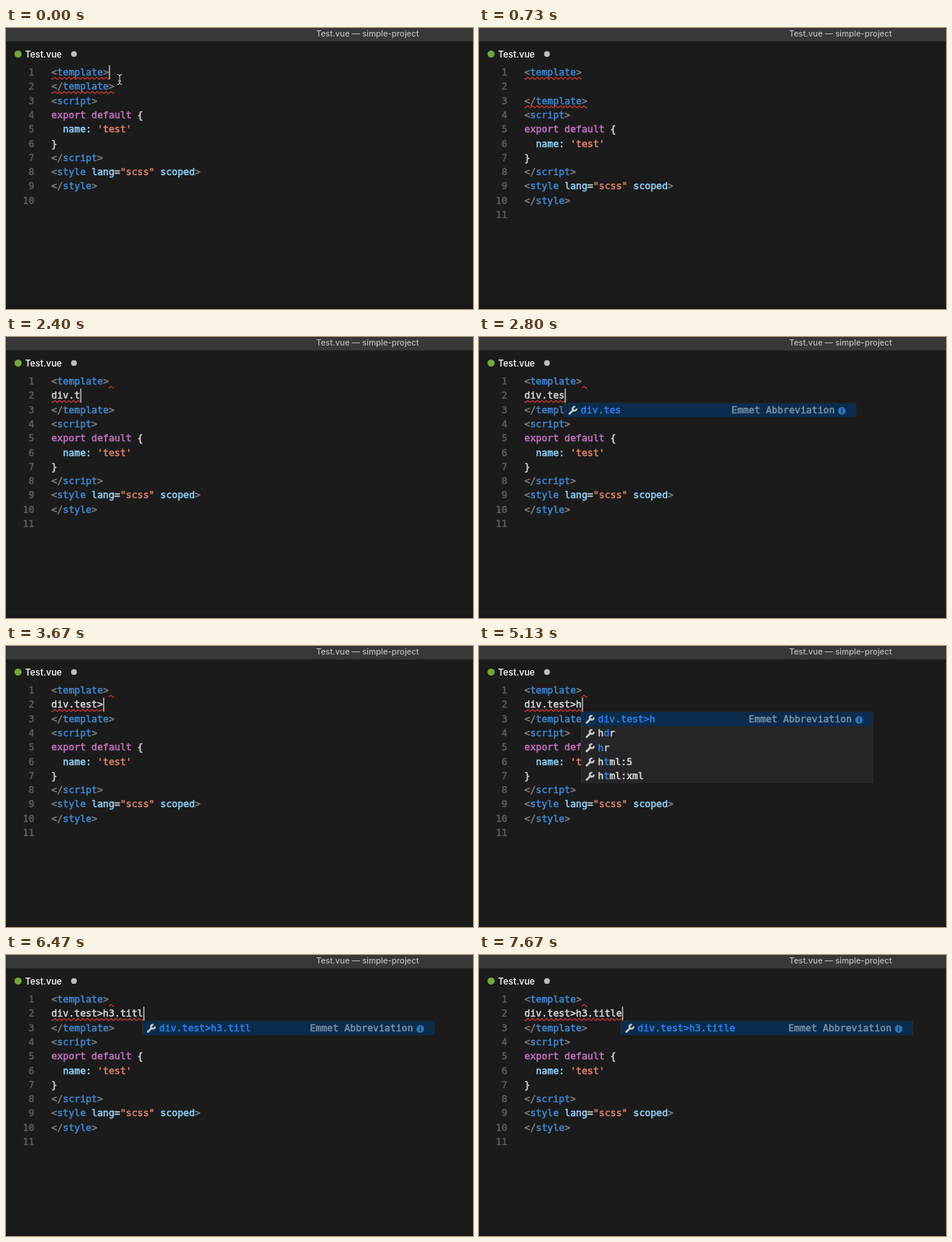
Animation, 600 px wide and 361 px high, one loop 8000 ms. Source, as an HTML page with a canvas:

```html
<!DOCTYPE html>
<html lang="en">
<head>
<meta charset="utf-8">
<title>Editor</title>
<style>
  html, body { margin: 0; width: 100%; height: 100%; overflow: hidden; background: #1b1b1b; }
  canvas { display: block; width: 600px; height: 361px; }
</style>
</head>
<body>
<canvas id="stage"></canvas>
<script>
const W = 600, H = 361, LOOP = 8000;
const CW = 7.37, LH = 18.3, LEFT = 58.3, TOP = 57;
const MONO = '12.24px "DejaVu Sans Mono", monospace';
const UI = 'Inter, "Open Sans", sans-serif';
const C = {
  bg: '#1b1b1b', text: '#d6d6d6', punct: '#7c7c7c', tag: '#3f86d0', attr: '#90d2fb',
  str: '#da8064', key: '#c26fc0', num: '#5c5c5c', error: '#d8392f', match: '#2b80ea',
  select: '#0b2c4c', detail: '#7690a6', info: '#2f76b8'
};

const canvas = document.getElementById('stage');
const ctx = canvas.getContext('2d', { alpha: false });
const dpr = window.devicePixelRatio || 1;
canvas.width = Math.round(W * dpr);
canvas.height = Math.round(H * dpr);

// Each line is a list of [colour, text] spans.
const tagLine = (open, name) => [['punct', open], ['tag', name], ['punct', '>']];
const head = tagLine('<', 'template');
const tail = [
  tagLine('</', 'template'),
  tagLine('<', 'script'),
  [['key', 'export default'], ['text', ' {']],
  [['attr', '  name:'], ['str', " 'test'"]],
  [['text', '}']],
  tagLine('</', 'script'),
  [['punct', '<'], ['tag', 'style'], ['attr', ' lang'], ['text', '='],
   ['str', '"scss"'], ['attr', ' scoped'], ['punct', '>']],
  tagLine('</', 'style'),
  []
];

const ENTER = 70, RECHECK = 1870, BLINK = 500;
const typed = 'div.test>h3.title';
const keys = [1000, 1470, 1600, 1800, 2270, 2600, 2800, 3000, 3670,
              4660, 5200, 5330, 5530, 6130, 6330, 6470, 6660];

// Suggestions by time; "=" stands for the typed text, brackets mark matches.
const menus = [
  [0, ''],
  [1130, '[d]atag [d]atal [d]et [d]lg [d]oc [d]d [d]iv [d]l [d]t'],
  [1470, '[di]v'],
  [1600, '[div]'],
  [1800, ''],
  [2470, '= tar[e]a [te]m t[e]x[t]area'],
  [2800, '='],
  [3670, ''],
  [4870, '= h[d]r [h]r h[t]ml:5 h[t]ml:xml'],
  [5200, '='],
  [5530, '= tar[e]a [te]m t[e]x[t]area'],
  [6130, '=']
];

const lineY = i => TOP + i * LH;
const colX = n => LEFT + n * CW;

function label(str, x, y, color, font, align = 'left') {
  ctx.font = font;
  ctx.textAlign = align;
  ctx.fillStyle = color;
  ctx.fillText(str, x, y);
}

function box(x, y, w, h, color) {
  ctx.fillStyle = color;
  ctx.fillRect(x, y, w, h);
}

function dot(x, y, r, color) {
  ctx.fillStyle = color;
  ctx.beginPath();
  ctx.arc(x, y, r, 0, Math.PI * 2);
  ctx.fill();
}

// A thin outline gives the text its heavier weight.
function code(str, x, y, color, align) {
  label(str, x, y + 4, color, MONO, align);
  ctx.strokeStyle = color;
  ctx.lineWidth = 0.5;
  ctx.lineJoin = 'round';
  ctx.strokeText(str, x, y + 4);
}

function drawLine(spans, row) {
  let col = 0;
  for (const [kind, str] of spans) {
    code(str, colX(col), lineY(row), C[kind]);
    col += str.length;
  }
}

function squiggle(row, from, to) {
  const y = lineY(row) + 7.6, end = colX(to);
  ctx.strokeStyle = C.error;
  ctx.lineWidth = 1.1;
  ctx.beginPath();
  for (let x = colX(from); x <= end; x += 0.5) {
    ctx.lineTo(x, y + 1.2 * Math.sin((x - LEFT) * Math.PI / 3));
  }
  ctx.stroke();
}

function drawFrame() {
  box(0, 0, W, H, C.bg);
  box(0, 0, W, 17, '#383838');
  box(0, 17, W, 1, '#222');
  box(0, 356, W, 5, '#181818');
  label('Test.vue — simple-project', 464.5, 11.2, '#bababa', '500 10.5px ' + UI, 'center');
  dot(15.5, 33.5, 4.6, '#72a83c');
  label('Test.vue', 24.5, 37.5, '#ececec', '600 11.3px ' + UI);
  dot(87.3, 33.4, 3.7, '#bdbdbd');
}

function drawPointer(x, y) {
  ctx.strokeStyle = '#d0d0d0';
  ctx.lineWidth = 1;
  ctx.beginPath();
  for (const s of [-1, 1]) {
    ctx.moveTo(x - 3, y + s * 6.5);
    ctx.quadraticCurveTo(x, y + s * 6.5, x, y + s * 4);
    ctx.quadraticCurveTo(x, y + s * 6.5, x + 3, y + s * 6.5);
  }
  ctx.moveTo(x, y - 5);
  ctx.lineTo(x, y + 5);
  ctx.moveTo(x - 2, y + 2);
  ctx.lineTo(x + 2, y + 2);
  ctx.stroke();
}

function drawWrench(x, y) {
  ctx.strokeStyle = '#c8c8c8';
  ctx.lineCap = 'round';
  ctx.lineWidth = 2.6;
  ctx.beginPath();
  ctx.moveTo(x - 4.2, y + 4.2);
  ctx.lineTo(x + 0.8, y - 0.8);
  ctx.stroke();
  ctx.lineCap = 'butt';
  ctx.lineWidth = 2.2;
  ctx.beginPath();
  ctx.arc(x + 2.3, y - 2.3, 2.6, -0.15, Math.PI * 1.6);
  ctx.stroke();
}

function drawMenu(list, word) {
  const rows = list.split(' ');
  const x = Math.round(colX(word.length) - 1.2), y = 84.6, w = 375.5;
  const h = rows.length * LH;
  box(x, y, w, h, '#323234');
  box(x + 1, y + 0.4, w - 2, h - 1, '#252527');
  box(x + 1, y + 0.4, w - 2, LH - 0.4, C.select);
  rows.forEach((row, i) => {
    const cy = y + LH * (i + 0.5) + 0.4;
    drawWrench(x + 11.5, cy + 0.3);
    let tx = x + 21.8;
    row.replace('=', `[${word}]`).split(/[[\]]/).forEach((part, k) => {
      code(part, tx, cy, k % 2 ? C.match : C.text);
      tx += part.length * CW;
    });
  });
  const cy = y + LH / 2 + 0.4;
  code('Emmet Abbreviation', x + 215.5, cy, C.detail);
  dot(x + 357.2, cy + 0.8, 4.9, C.info);
  box(x + 356.5, cy - 0.6, 1.5, 4.2, C.select);
  box(x + 356.5, cy - 2.6, 1.5, 1.3, C.select);
}

function render(t) {
  const entered = t >= ENTER;
  const pressed = keys.filter(k => k <= t);
  const count = pressed.length;
  const word = typed.slice(0, count);
  const shift = entered ? 2 : 1;

  ctx.setTransform(dpr, 0, 0, dpr, 0, 0);
  drawFrame();

  const total = tail.length + shift;
  for (let i = 0; i < total; i++) {
    code(String(i + 1), 36.3, lineY(i), C.num, 'right');
  }
  drawLine(head, 0);
  tail.forEach((spans, i) => drawLine(spans, i + shift));
  if (count) {
    code(word, colX(0), lineY(1), C.text);
    squiggle(1, 0, count);
  }
  if (t < RECHECK) {
    squiggle(0, 0, 10);
    squiggle(shift, 0, 11);
  } else {
    squiggle(0, 10, 11);
  }

  const last = count ? pressed[count - 1] : entered ? ENTER : 0;
  if (Math.floor((t - last) / BLINK) % 2 === 0) {
    const row = entered ? 1 : 0;
    box(colX(entered ? count : 10) + 0.2, lineY(row) - 9, 1.4, 18, '#c4c4c0');
  }
  if (!entered) drawPointer(146, 66);

  const list = menus.filter(m => m[0] <= t).pop()[1];
  if (list) drawMenu(list, word);
}

const start = performance.now();
function tick() {
  render((performance.now() - start) % LOOP);
  requestAnimationFrame(tick);
}
tick();
</script>
</body>
</html>
```
